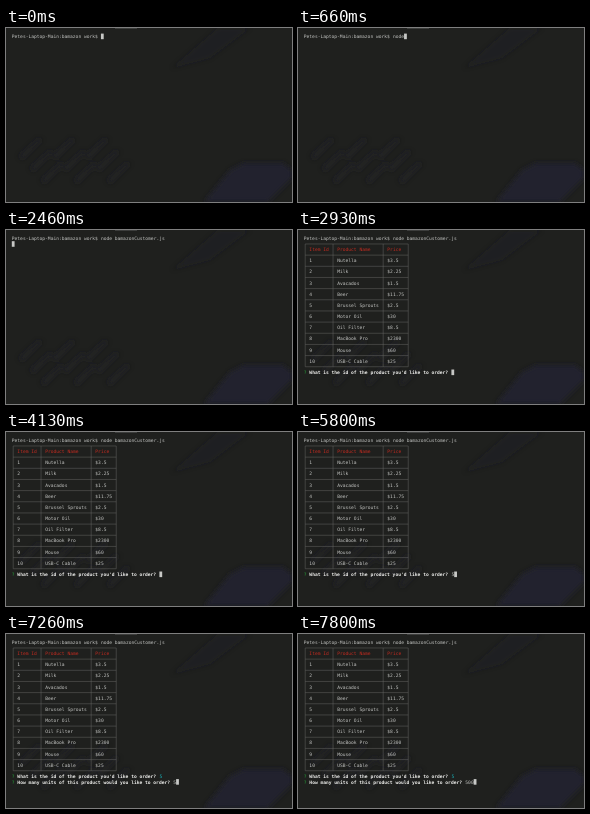
These frames come from a looping animation (286 by 174 pixels, 8000 ms). An HTML page:

```html
<!DOCTYPE html>
<html lang="en">
<head>
<meta charset="utf-8">
<title>Terminal order</title>
<style>
  html, body { margin: 0; width: 100%; height: 100%; overflow: hidden; background: #1f201e; }
  svg { display: block; width: 100%; height: 100%; }
  text { font-family: "DejaVu Sans Mono", monospace; font-size: 4.626px; fill: #c4c5c3; white-space: pre; text-rendering: geometricPrecision; }
  .head { fill: #c42b20; }
  .ask { fill: #f0f0ee; font-weight: bold; }
  .mark { fill: #25a53a; }
  .answer { fill: #18b3bb; }
  .rule { stroke: #666765; stroke-width: .5; fill: none; }
  .tint { fill: #21212d; }
</style>
</head>
<body>
<svg viewBox="0 0 286 174" xmlns="http://www.w3.org/2000/svg">
  <defs>
    <filter id="soft" x="-20%" y="-20%" width="140%" height="140%"><feGaussianBlur stdDeviation="2"/></filter>
  </defs>
  <rect width="286" height="174" fill="#1f201e"/>
  <g id="backdrop" class="tint" filter="url(#soft)">
    <path d="M198 174L224 142L238 135H277L286 142V150L262 174Z"/>
    <path d="M166 40L212 0H244L204 30Z" opacity=".3"/>
  </g>
  <rect x="109" width="22" height=".7" fill="#4a4b49"/>
  <g id="screen"></g>
</svg>
<script>
const LOOP = 8000, CELL = 2.785, LINE = 5.58, LEFT = 5.8, MIDDLE = 8.4;
const screen = document.getElementById('screen');
const colX = col => LEFT + col * CELL;
const lineY = line => MIDDLE + line * LINE;

function add(parent, tag, attrs, content = '') {
  const el = document.createElementNS('http://www.w3.org/2000/svg', tag);
  for (const name in attrs) el.setAttribute(name, attrs[name]);
  el.textContent = content;
  return parent.appendChild(el);
}
const group = () => add(screen, 'g', {});
const write = (parent, line, col, content, style = '') =>
  add(parent, 'text', { x: colX(col), y: lineY(line) + 1.6, class: style }, content);

// Faint diagonal streaks behind the lower left text
const backdrop = document.getElementById('backdrop');
for (let i = 0; i < 9; i++) {
  const x = 12 + i * 11, y = 128 + (i % 3) * 12;
  add(backdrop, 'path', { d: `M${x} ${y}l20 -18l5 2l-20 20z`, opacity: .45 });
}

const prompt = 'Petes-Laptop-Main:bamazon work$ ';
const idQuestion = "What is the id of the product you'd like to order? ";
const unitsQuestion = 'How many units of this product would you like to order? ';
const rows = [
  ['Item Id', 'Product Name', 'Price'],
  ['1', 'Nutella', '$3.5'],
  ['2', 'Milk', '$2.25'],
  ['3', 'Avacados', '$1.5'],
  ['4', 'Beer', '$11.75'],
  ['5', 'Brussel Sprouts', '$2.5'],
  ['6', 'Motor Oil', '$30'],
  ['7', 'Oil Filter', '$8.5'],
  ['8', 'MacBook Pro', '$2300'],
  ['9', 'Mouse', '$60'],
  ['10', 'USB-C Cable', '$25']
];
const bars = [0, 10, 28, 37];

write(screen, 0, 0, prompt);
const command = write(screen, 0, prompt.length, '');

const table = group();
const barX = col => colX(col + .5);
for (const col of bars)
  add(table, 'path', { class: 'rule', d: `M${barX(col)} ${lineY(1)}V${lineY(23)}` });
for (let line = 1; line <= 23; line += 2)
  add(table, 'path', { class: 'rule', d: `M${barX(0)} ${lineY(line)}H${barX(37)}` });
rows.forEach((row, r) => row.forEach((cell, c) =>
  write(table, 2 + r * 2, bars[c] + 2, cell, r ? '' : 'head')));

function question(line, content) {
  const box = group();
  write(box, line, 0, '?', 'mark');
  write(box, line, 2, content, 'ask');
  return { box, line, col: content.length + 2, reply: write(box, line, content.length + 2, '') };
}
const askId = question(24, idQuestion);
const askUnits = question(25, unitsQuestion);
const cursor = add(screen, 'rect', { width: CELL, height: 5.6, fill: '#c7c8c6' });

// Each entry: time, text typed so far
const commandKeys = [[200, 'n'], [330, 'no'], [460, 'nod'], [660, 'node'], [1060, 'node '],
  [1530, 'node b'], [1600, 'node ba'], [1860, 'node bamazonCustomer.js ']];
const idKeys = [[5800, '5']];
const unitKeys = [[7200, '5'], [7400, '50'], [7530, '500']];
const RUN = 2460, LIST = 2930, UNITS = 6460;

const typed = (keys, t) => keys.reduce((now, [at, value]) => t >= at ? value : now, '');
const show = (el, on) => el.setAttribute('visibility', on ? 'visible' : 'hidden');

function moveCursor(line, col) {
  cursor.setAttribute('x', colX(col));
  cursor.setAttribute('y', lineY(line) - 2.8);
}

function draw(now) {
  const t = now % LOOP;
  const cmd = typed(commandKeys, t), id = typed(idKeys, t), units = typed(unitKeys, t);
  command.textContent = cmd;
  askId.reply.textContent = id;
  askUnits.reply.textContent = units;
  askId.reply.setAttribute('class', t >= UNITS ? 'answer' : '');
  show(table, t >= LIST);
  show(askId.box, t >= LIST);
  show(askUnits.box, t >= UNITS);

  if (t < RUN) moveCursor(0, prompt.length + cmd.length);
  else if (t < LIST) moveCursor(1, 0);
  else if (t < UNITS) moveCursor(askId.line, askId.col + id.length);
  else moveCursor(askUnits.line, askUnits.col + units.length);
}

function tick() {
  draw(performance.now());
  requestAnimationFrame(tick);
}
tick();
</script>
</body>
</html>
```
